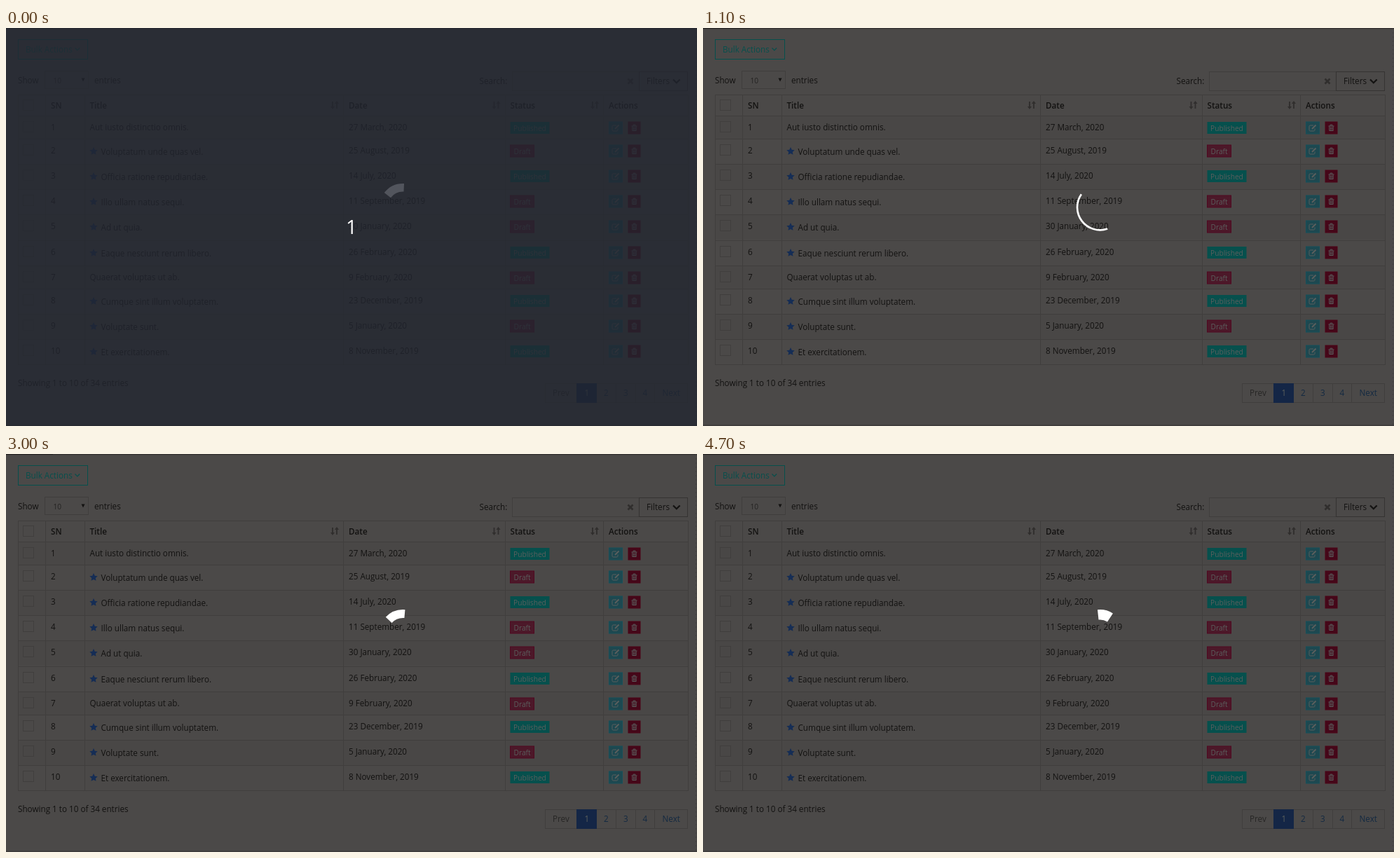
These frames come from a looping animation (986 by 568 pixels, 4800 ms). An HTML page:

```html
<!DOCTYPE html>
<html lang="en">
<head>
<meta charset="utf-8">
<title>Table loading</title>
<style>
  html, body { margin: 0; width: 100%; height: 100%; overflow: hidden; background: #4b4948; }
  svg { display: block; font: 11.7px "Open Sans", "Noto Sans", sans-serif; }
  .head { font-weight: 600; }
  .small { font-size: 10.2px; }
</style>
</head>
<body>
<svg id="stage" width="986" height="568" viewBox="0 0 986 568"></svg>
<script>
const stage = document.getElementById('stage');
const INK = '#131211', LINE = '#403e3d', TEAL = '#06504d', FADED = '#302e2d',
  LINK = '#142a42', PALE = '#5b5f5e';

const rect = (x, y, w, h, fill, stroke = 'none') =>
  `<rect x="${x}" y="${y}" width="${w}" height="${h}" fill="${fill}" stroke="${stroke}"/>`;
const box = (x, y, w, h, stroke = LINE) => rect(x + .5, y + .5, w, h, 'none', stroke);
const text = (x, y, s, fill = INK, cls = '') =>
  `<text x="${x}" y="${y}" fill="${fill}" class="${cls}">${s}</text>`;
const line = (d, stroke = LINE, width = 1) =>
  `<path d="${d}" fill="none" stroke="${stroke}" stroke-width="${width}"/>`;
const shape = (d, fill) => `<path d="${d}" fill="${fill}"/>`;

function star(x, y) {
  let d = '';
  for (let i = 0; i < 10; i++) {
    const r = i % 2 ? 2.9 : 6, a = (i * 36 - 90) * Math.PI / 180;
    d += `${i ? 'L' : 'M'}${x + r * Math.cos(a)} ${y + r * Math.sin(a)}`;
  }
  return shape(d + 'Z', '#152d55');
}

const sortIcon = x =>
  line(`M${x + 3} 105v9M${x + 9} 106v9`, FADED, 1.8) +
  shape(`M${x} 112h6l-3 4zM${x + 6} 108h6l-3-4z`, FADED);

function badge(y, published) {
  return published
    ? rect(719.5, y - 8.5, 56, 17, TEAL) + text(724, y + 4, 'Published', PALE, 'small')
    : rect(719.5, y - 8.5, 34, 17, '#4c1829', '#500820') + text(724.5, y + 4, 'Draft', PALE, 'small');
}

function actions(y) {
  return rect(860.5, y - 8.5, 19, 17, '#1d4850', '#15505a') +
    line(`M871 ${y - 3.5}h-4.5q-1.5 0-1.5 1.5v5q0 1.5 1.5 1.5h5q1.5 0 1.5-1.5v-2`, PALE) +
    line(`M869 ${y + 1.5}l5.5-5.5`, PALE, 2) +
    rect(888, y - 8.5, 17, 17, '#450719', '#4c0417') +
    line(`M892.5 ${y - 2.5}h8M895 ${y - 3}v-1.3h3v1.3`, PALE) +
    line(`M893.8 ${y - 2}v6h5.4v-6M895.6 ${y - 1}v4M897.4 ${y - 1}v4`, PALE);
}

const entries = [
  ['Aut iusto distinctio omnis.', '27 March, 2020', 1, 0],
  ['Voluptatum unde quas vel.', '25 August, 2019', 0, 1],
  ['Officia ratione repudiandae.', '14 July, 2020', 1, 1],
  ['Illo ullam natus sequi.', '11 September, 2019', 0, 1],
  ['Ad ut quia.', '30 January, 2020', 0, 1],
  ['Eaque nesciunt rerum libero.', '26 February, 2020', 1, 1],
  ['Quaerat voluptas ut ab.', '9 February, 2020', 0, 0],
  ['Cumque sint illum voluptatem.', '23 December, 2019', 1, 1],
  ['Voluptate sunt.', '5 January, 2020', 0, 1],
  ['Et exercitationem.', '8 November, 2019', 1, 1]
];

function table() {
  let out = '', top = 125;
  entries.forEach(([title, date, published, starred], i) => {
    const y = Math.floor(top), height = starred ? 36.25 : 33;
    if (i % 2 == 0) out += rect(17, y, 956, height, 'rgba(0,0,0,.025)');
    out += line(`M17 ${y + .5}H973`) + box(24, y + 8, 15, 15) +
      text(64, y + 20.5, i + 1) + text(489, y + 20.5, date) +
      (starred ? star(125, y + 18) + text(135.5, y + 22.5, title) : text(119.5, y + 20.5, title)) +
      badge(y + 17.5, published) + actions(y + 17.5);
    top += height;
  });
  const heads = [[64, 'SN'], [119.5, 'Title'], [489, 'Date'], [719.5, 'Status'], [860, 'Actions']];
  return out + box(17, 95, 956, 385) + box(24, 102, 15, 15) +
    [56, 112, 481, 712, 852].map(x => line(`M${x + .5} 95V481`)).join('') +
    heads.map(([x, s]) => text(x, 114.5, s, INK, 'head')).join('') +
    [463, 693.5, 834].map(sortIcon).join('');
}

function toolbar() {
  return box(17, 16, 99, 28, TEAL) + text(28, 34.5, 'Bulk Actions', TEAL) +
    line('M98.5 28.5l3.3 3.3 3.3-3.3', TEAL, 1.2) +
    text(17, 78.5, 'Show') + box(55, 61, 62, 25) + text(67.5, 78.5, '10', '#242322', 'small') +
    shape('M107.5 71.5h5l-2.5 5z', INK) + text(126, 78.5, 'entries') +
    text(675.5, 80, 'Search:') + box(722, 62, 181, 27) +
    line('M887.5 72.5l7 7M894.5 72.5l-7 7', FADED, 2.6) +
    box(903, 62, 69, 27, '#353332') + text(914, 80, 'Filters') +
    line('M952 73.5l4.8 4.8 4.8-4.8', INK, 2.2);
}

function pager() {
  const links = [[780, 'Prev', '#272625'], [825.5, '1', PALE], [853, '2', LINK],
    [881, '3', LINK], [908.5, '4', LINK], [936.5, 'Next', LINK]];
  return text(17, 510.5, 'Showing 1 to 10 of 34 entries') + box(769, 507, 203, 27) +
    [842, 870, 898, 925].map(x => line(`M${x + .5} 507v28`)).join('') +
    rect(814, 507, 29, 28, '#142646') +
    links.map(([x, s, fill]) => text(x, 525, s, fill)).join('');
}

const edges = rect(0, 0, 986, 1, '#353332') + rect(0, 0, 67, 1, '#242322') +
  rect(0, 1, 986, 1, '#434140') + rect(0, 566, 986, 2, '#403e3d') +
  '<path d="M984.5 0V568" stroke="#403e3d" stroke-dasharray="2 4"/>';

stage.innerHTML = edges + toolbar() + table() + pager() +
  '<path id="arc" fill="none" stroke="#fff"/><g id="cover">' +
  rect(0, 0, 986, 568, 'rgba(34,38,48,.78)') +
  '<text x="493" y="294" text-anchor="middle" font-size="28" fill="#fff">1</text></g>';

const arc = document.getElementById('arc'), cover = document.getElementById('cover');

// phase in tenths of a second, start angle, end angle, stroke width
const poses = [
  [0, 223, 275, 12], [1, 244, 290, 13.5], [2, 264, 303, 14.5], [3, 287, 326, 14],
  [6, 315, 394, 9], [7, 336, 427, 7.5], [9, 373, 534, 3.5], [11, 431, 575, 2.6],
  [12, 478, 587, 4], [15, 583, 635, 12]
];

function drawArc(phase) {
  const i = poses.findIndex(p => p[0] > phase), a = poses[i - 1], b = poses[i];
  const k = (phase - a[0]) / (b[0] - a[0]);
  const [, from, to, width] = a.map((v, j) => v + (b[j] - v) * k);
  const r = 33.8 - width / 2;
  const point = deg => {
    const rad = deg * Math.PI / 180;
    return `${566.5 + r * Math.cos(rad)} ${255.8 + r * Math.sin(rad)}`;
  };
  arc.setAttribute('d', `M${point(from)}A${r} ${r} 0 0 1 ${point(to)}`);
  arc.setAttribute('stroke-width', width);
}

const began = performance.now();
function draw() {
  const step = Math.floor((performance.now() - began) % 4800 / 100);
  cover.style.display = step ? 'none' : '';
  drawArc(step ? step % 15 : 14.85);
  requestAnimationFrame(draw);
}
draw();
</script>
</body>
</html>
```
